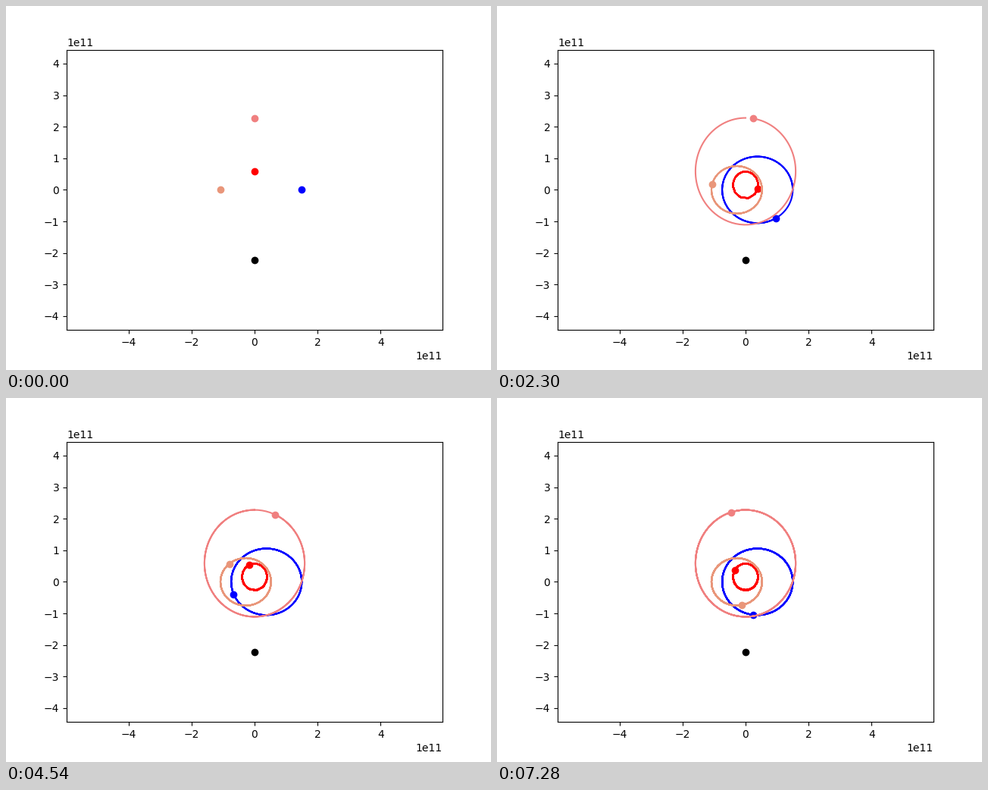
These frames come from a looping animation (640x480 px, 7300 ms). A matplotlib script:

```python
import numpy as np
import matplotlib.pyplot as plt
from matplotlib.animation import FuncAnimation

FRAMES = 365
INTERVAL = 20
X_MAX = 5.96e11

# color, farthest distance, eccentricity, degrees per frame, start direction
ORBITS = [
    ("blue", 1.496e11, 0.336, 5.616, 0),
    ("red", 0.579e11, 0.357, 23.945, 90),
    ("darksalmon", 1.082e11, 0.3456, 9.231, 180),
    ("lightcoral", 2.279e11, 0.346, 3.0295, 90),
]


def orbit_path(far, ecc, rate, direction):
    """Kepler motion around the origin, starting at the farthest point."""
    mean = np.radians(rate * np.arange(FRAMES))
    anomaly = mean.copy()
    for _ in range(30):
        slope = 1 + ecc * np.cos(anomaly)
        anomaly -= (anomaly + ecc * np.sin(anomaly) - mean) / slope
    a = far / (1 + ecc)
    u = a * (np.cos(anomaly) + ecc)
    v = a * np.sqrt(1 - ecc**2) * np.sin(anomaly)
    c, s = np.cos(np.radians(direction)), np.sin(np.radians(direction))
    return c * u - s * v, s * u + c * v


fig, ax = plt.subplots(figsize=(6.4, 4.8), dpi=100)
ax.set_position([0.125, 0.11, 0.775, 0.77])
y_max = X_MAX * 369.6 / 496
ax.set_xlim(-X_MAX, X_MAX)
ax.set_ylim(-y_max, y_max)
ax.plot([0], [-2.235e11], "o", color="black")

bodies = []
for color, *shape in ORBITS:
    trail, = ax.plot([], [], color=color)
    dot, = ax.plot([], [], "o", color=color)
    bodies.append((trail, dot, *orbit_path(*shape)))


def update(i):
    for trail, dot, x, y in bodies:
        trail.set_data(x[:i], y[:i])  # the trail lags one step behind
        dot.set_data([x[i]], [y[i]])
    return [artist for body in bodies for artist in body[:2]]


anim = FuncAnimation(fig, update, frames=FRAMES, interval=INTERVAL,
                     init_func=lambda: update(0), repeat=True, repeat_delay=0)
plt.show()
```
